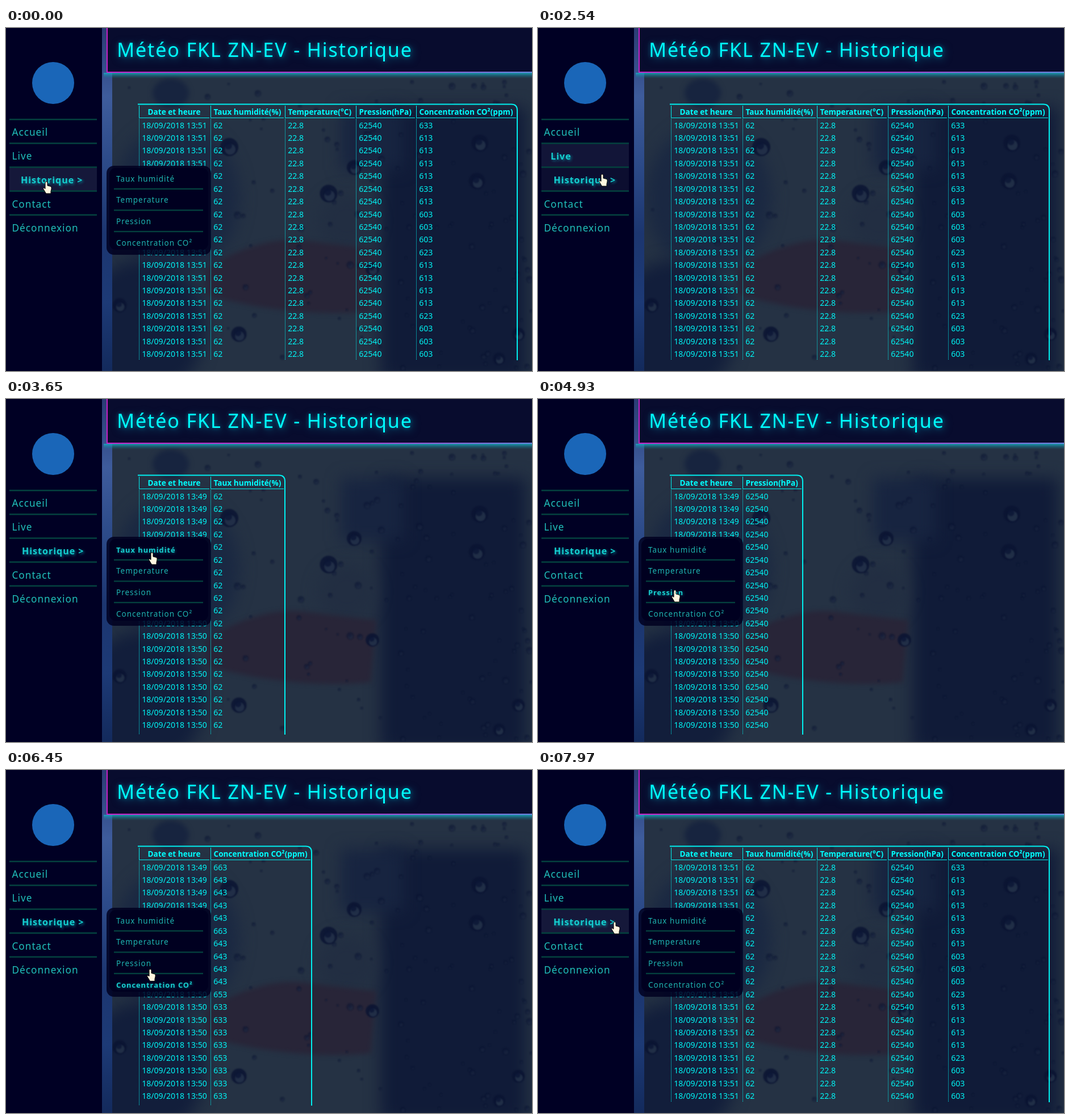
These frames come from a looping animation (926 by 605 pixels, 8 s). An HTML page with a canvas:

```html
<!DOCTYPE html>
<html lang="fr">
<head>
<meta charset="utf-8">
<title>Historique</title>
<style>
html, body { margin: 0; width: 100%; height: 100%; overflow: hidden; background: #000024; }
canvas, #ui { position: absolute; left: 0; top: 0; width: 926px; height: 605px; }
text { font-family: "Noto Sans", "Open Sans", sans-serif; fill: #00f4f4; }
.title {
  font-size: 34px; letter-spacing: 1.9px; fill: #0ff;
  filter: drop-shadow(0 0 3px rgba(0, 150, 180, .6)) drop-shadow(3px 3px 7px rgba(0, 150, 180, .5));
}
.th { font-size: 13.6px; font-weight: 700; fill: #0ff; }
.td { font-size: 14.1px; }
.menu { font-size: 17.2px; letter-spacing: 1px; fill: #20c0ba; }
.menu.on { font-size: 16px; font-weight: 700; fill: #14cfd0; filter: drop-shadow(2px 2px 2px rgba(0, 190, 200, .6)); }
.sub { font-size: 13.5px; letter-spacing: 1px; fill: #1eb4b0; }
.sub.on { font-size: 12.8px; font-weight: 700; fill: #18cfcf; filter: drop-shadow(1px 1px 2px rgba(0, 180, 190, .5)); }
</style>
</head>
<body>
<canvas id="photo" width="926" height="605"></canvas>
<svg id="ui" viewBox="0 0 926 605">
  <defs>
    <linearGradient id="edge" gradientUnits="userSpaceOnUse" x1="178" x2="926" y1="0" y2="0">
      <stop offset="0" stop-color="#c81ec4"/>
      <stop offset=".6" stop-color="#b03cd0"/>
      <stop offset="1" stop-color="#6a80dc"/>
    </linearGradient>
    <linearGradient id="glow" x1="0" x2="0" y1="0" y2="1">
      <stop offset="0" stop-color="#18b4cc" stop-opacity=".8"/>
      <stop offset="1" stop-color="#107890" stop-opacity="0"/>
    </linearGradient>
  </defs>
</svg>
<script>
const LOOP = 8000;
const ui = document.getElementById('ui');

function el(tag, attrs, parent = ui, text) {
  const node = document.createElementNS('http://www.w3.org/2000/svg', tag);
  for (const k in attrs) node.setAttribute(k, attrs[k]);
  if (text) node.textContent = text;
  return parent.appendChild(node);
}
const rect = (x, y, width, height, fill, parent, more) =>
  el('rect', { x, y, width, height, fill, ...more }, parent);
const label = (x, y, cls, text, parent) => el('text', { x, y, class: cls }, parent, text);
const stroke = (d, width, parent, more) =>
  el('path', { d, fill: 'none', stroke: '#00f0f0', 'stroke-width': width, ...more }, parent);

// --- Rainy window behind the page ---
function paintPhoto() {
  const c = document.getElementById('photo').getContext('2d');
  let seed = 11;
  const rnd = () => (seed = seed * 16807 % 2147483647) / 2147483647;
  const box = (x, y, w, h, color) => {
    c.fillStyle = color;
    c.fillRect(x, y, w, h);
  };
  const oval = (x, y, rx, ry, color) => {
    c.fillStyle = color;
    c.beginPath();
    c.ellipse(x, y, rx, ry, 0, 0, 7);
    c.fill();
  };
  const drop = (x, y, r, alpha) => {
    c.globalAlpha = alpha;
    oval(x, y, r, r, '#0a1433');
    oval(x + r * .1, y + r * .25, r * .6, r * .6, '#25324a');
    oval(x - r * .1, y - r * .15, r * .4, r * .4, '#0c1636');
    c.globalAlpha = 1;
  };

  box(169, 0, 757, 605, '#253244');
  c.filter = 'blur(14px)';
  box(660, 140, 255, 480, '#101b38');
  box(590, 140, 110, 110, '#172440');
  oval(300, 300, 110, 130, '#1a2842');
  oval(240, 530, 110, 120, '#121e3b');
  oval(600, 340, 50, 50, '#222e42');
  c.filter = 'blur(4px)';
  oval(290, 115, 32, 26, '#17243f');
  c.fillStyle = '#282538';
  c.beginPath();
  c.moveTo(350, 425);
  c.quadraticCurveTo(440, 370, 515, 374);
  c.lineTo(652, 390);
  c.lineTo(642, 500);
  c.quadraticCurveTo(500, 512, 350, 470);
  c.fill();
  c.filter = 'blur(1px)';
  for (let i = 0; i < 130; i++) {
    const x = 195 + 730 * Math.sqrt(rnd()), y = 95 + rnd() * 505;
    drop(x, y, 2 + 5 * rnd() ** 2, .4);
  }
  [[393, 210], [568, 292], [834, 203], [829, 270], [410, 540], [613, 246], [200, 489], [645, 425],
   [902, 540], [868, 583]].forEach(([x, y], i) => drop(x, y, 16 - i * .6, .85));

  // uncovered strip beside the menu, and the header
  c.filter = 'none';
  const strip = c.createLinearGradient(0, 0, 0, 605);
  ['#2a3c74', '#3e5c9c', '#2c4a88', '#1c3670', '#1d3a76', '#132a5c']
    .forEach((color, i) => strip.addColorStop(i / 5, color));
  box(169, 0, 18, 605, strip);
  box(178, 0, 748, 77, '#080c2e');
}
paintPhoto();

rect(172, 79, 754, 10, 'url(#glow)');
rect(177, 0, 2, 79, '#c81ec4');
rect(177, 77, 749, 2, 'url(#edge)');
label(195.2, 51, 'title', 'Météo FKL ZN-EV - Historique');

// --- Tables ---
const ROW = 22.42;
const columns = {
  date: { head: 'Date et heure', w: 126, value: (r, full) => '18/09/2018 13:' + (full ? 51 : r < 5 ? 49 : 50) },
  hum: { head: 'Taux humidité(%)', w: 131, value: () => '62' },
  temp: { head: 'Temperature(°C)', w: 125, value: () => '22.8' },
  pres: { head: 'Pression(hPa)', w: 106, value: () => '62540' },
  co2: { head: 'Concentration CO²(ppm)', w: 178, value: co2 }
};

// every fifth reading is a peak
function co2(r, full) {
  const peak = r % 5 === 0;
  if (!full) return (r < 10 ? 643 : 633) + (peak ? 20 : 0);
  const dip = r > 6 && (r + 2) % 9 < 3;
  return 613 - (dip ? 10 : 0) + (peak ? (r < 10 ? 20 : 10) : 0);
}

function makeTable(keys) {
  const full = keys.length > 2, bottom = full ? 586 : 592;
  const g = el('svg', { width: 926, height: bottom });
  let x = 234.5;
  for (const key of keys) {
    const { head, w, value } = columns[key];
    stroke(`M${x} 137V158.5H${x + w - 2.5}`, 1, g);
    stroke(`M${x} 160V${bottom}`, 1, g, { 'stroke-dasharray': '1 1' });
    label(x + (key === 'date' ? 15 : 5), 153, 'th', head, g);
    for (let r = 0; r < (full ? 19 : 20); r++)
      label(x + 4.7, 176.6 + r * ROW, 'td', value(r, full), g);
    x += w;
  }
  stroke(`M232 134.5H${x - 11}Q${x - .5} 134.5 ${x - .5} 145V${bottom}`, 2, g);
  return g;
}
const tables = { all: makeTable(Object.keys(columns)) };
for (const key of ['hum', 'temp', 'pres', 'co2']) tables[key] = makeTable(['date', key]);

// --- Side menu and submenu ---
const STEP = 42.1, SUB = 37.6;
const rowTop = i => 161 + i * STEP;
const subTop = i => 246 + i * SUB;

rect(0, 0, 169, 605, '#000024');
el('circle', { cx: 83, cy: 97, r: 37, fill: '#1a66b8' });
const menu = ['Accueil', 'Live', 'Historique >', 'Contact', 'Déconnexion'].map((name, i) => {
  const bg = rect(6, rowTop(i), 154, STEP, '#15183a');
  rect(6, rowTop(i) - 1, 154, 2.6, '#04403e');
  return { bg, text: label(10.5, rowTop(i) + 29.2, 'menu', name) };
});

const panel = el('g', {});
rect(177, 243, 184, 157, '#000020', panel, { rx: 13, opacity: .85 });
rect(182, 247, 174, 144, '#000020', panel, { rx: 11 });
const subs = ['Taux humidité', 'Temperature', 'Pression', 'Concentration CO²'].map((name, i) => {
  if (i) rect(190, subTop(i) - 1, 157, 2.4, '#04403e', panel);
  return label(194, subTop(i) + 24.7, 'sub', name, panel);
});

// --- Pointer ---
const pointer = el('g', { stroke: '#000', 'stroke-width': 1 });
const hand = el('path', {
  fill: '#fff6e0',
  d: 'M-2 1Q0-1.5 2 1V7L8 8.500Q9.500 9.500 9 13L8 17V21H-.5L-5.500 12.500Q-5 9.500-2 12.500Z'
}, pointer);
const arrow = el('path', { fill: '#d8d8d8', d: 'M0 0V15L3.500 12L6 18L8.500 17L6 11H10.500Z' }, pointer);

const path = [[0, 71, 271], [840, 484, 279], [1240, 473, 220], [2250, 370, 226], [2360, 113, 228],
  [2534, 113, 258], [3400, 257, 271], [3930, 257, 271], [4930, 241, 337], [6050, 256, 376],
  [6330, 254, 352], [7150, 255, 270], [7300, 255, 270], [7970, 135, 268]];
const clicks = [[0, 'all'], [3650, 'hum'], [4490, 'temp'], [4900, 'pres'], [5760, 'co2'],
  [6880, 'temp'], [7970, 'all']];

function pointerAt(t) {
  const i = path.findIndex(p => p[0] > t);
  if (i < 0) return path[path.length - 1].slice(1);
  if (i === 0) return path[0].slice(1);
  const a = path[i - 1], b = path[i], u = (t - a[0]) / (b[0] - a[0]);
  return [1, 2].map(k => a[k] + (b[k] - a[k]) * u);
}

// share of the last 400 ms the pointer spent inside an area
function dwell(t, inside) {
  const N = 40;
  let hits = 0;
  for (let i = 0; i < N; i++) hits += inside(...pointerAt(t - i * 400 / N));
  return hits / N;
}
const inRow = i => (x, y) => x < 160 && y > rowTop(i) && y < rowTop(i + 1);
const inSub = i => (x, y) => x > 177 && x < 361 && y > subTop(i) && y < subTop(i + 1);
const inPanel = (x, y) => x > 160 && x < 361 && y > 243 && y < 400;

// --- Screen refreshes about every 140 ms while the pointer moves ---
const moves = [[0, 0], [160, 840], [1240, 2250], [2390, 3400], [3650, 3650],
  [3930, 4930], [5060, 6050], [6200, 7150], [7430, 7970]];
const ticks = moves.flatMap(([a, b]) => {
  const n = Math.round((b - a) / 140);
  return Array.from({ length: n + 1 }, (_, i) => a + (n ? (b - a) * i / n : 0));
});
const show = (node, on) => { node.style.display = on ? '' : 'none'; };

function render(time) {
  const t = ticks.filter(k => k <= time + .5).pop();
  const [x, y] = pointerAt(t);
  const page = clicks.filter(k => k[0] <= t).pop()[1];
  for (const key in tables) show(tables[key], key === page);

  menu.forEach(({ bg, text }, i) => {
    const stay = dwell(t, inRow(i)), lit = Math.min(1, stay * 3), current = i === 2;
    bg.setAttribute('opacity', lit);
    text.setAttribute('x', current ? 28 - 2 * stay : 10.5 + 13 * lit);
    text.classList.toggle('on', current || lit > .5);
  });

  const open = dwell(t, (px, py) => inRow(2)(px, py) || inPanel(px, py)) > .2;
  show(panel, open);
  subs.forEach((s, i) => s.classList.toggle('on', dwell(t, inSub(i)) > .5));

  const link = x < 160 || (open && inPanel(x, y));
  show(hand, link);
  show(arrow, !link);
  pointer.setAttribute('transform', `translate(${x.toFixed(1)} ${y.toFixed(1)})`);
}

const start = performance.now();
function loop() {
  render((performance.now() - start) % LOOP);
  requestAnimationFrame(loop);
}
loop();
</script>
</body>
</html>
```
